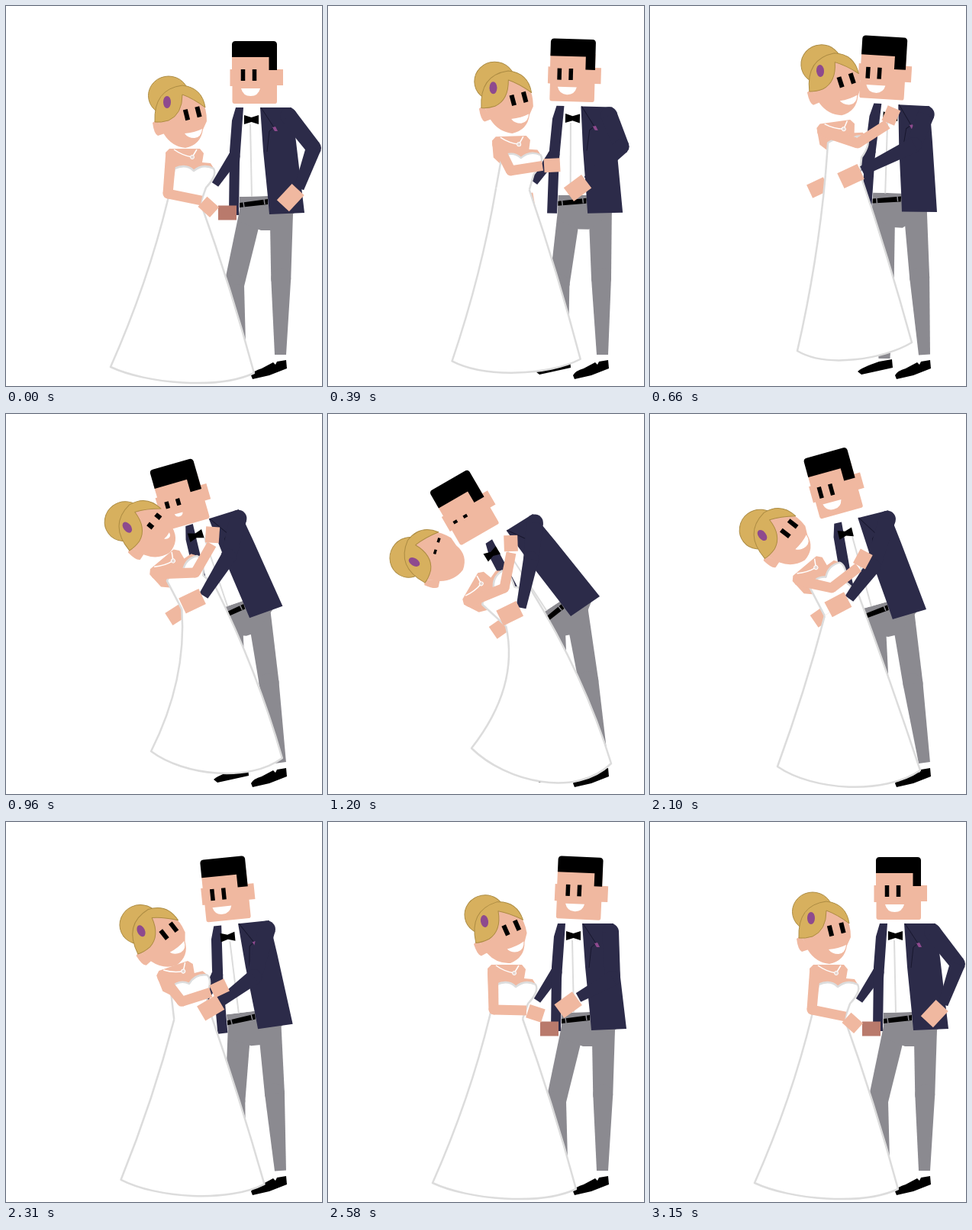
An HTML page with a canvas that plays this animation: 414x498 px, repeating every 3210 ms.

```html
<!DOCTYPE html>
<html lang="en">
<head>
<meta charset="utf-8">
<title>Dancing couple</title>
<style>
html, body { margin: 0; width: 100%; height: 100%; overflow: hidden; background: #fff; }
canvas { display: block; }
</style>
</head>
<body>
<canvas id="stage" width="414" height="498"></canvas>
<script>
const ctx = document.getElementById('stage').getContext('2d');
const LOOP = 3210, STEP = 30;
const SKIN = '#f0b8a0', SHADE = '#b97a6c', NAVY = '#2c2b49', GREY = '#8b8a90';
const LINE = '#dcdcdc', HAIR = '#d7b05e', HAIR_EDGE = '#ad8c43', PURPLE = '#8e4a8e';

// Each pose holds only joints; three numbers are x, y and a turn in degrees.
const stand = {
  coat: [391, 271, 0], elbow: [403, 186], wrist: [384, 239, 133], grip: [290, 271, 0],
  head: [325.5, 87, 0], look: [0],
  chest: [234, 256, 0], herElbow: [212, 246], herWrist: [256, 255, 42], herHead: [211, 126, 0],
  hem: [137, 473, 325, 481], flare: [11]
};
const embrace = {
  coat: [376, 270, 3], elbow: [346, 182], wrist: [278, 216, 155], grip: [220, 238, -25],
  head: [305.5, 81, 3.5], look: [1],
  chest: [252, 220, -8], herElbow: [272, 180], herWrist: [311, 155, -67], herHead: [223, 85, -4],
  hem: [193, 452, 343, 441], flare: [8]
};
const dip = {
  coat: [356, 239, -32], elbow: [266, 190], wrist: [253, 254, 154], grip: [226, 280, -35],
  head: [178.5, 122.5, -30], look: [1],
  chest: [246, 260, -60], herElbow: [231, 228], herWrist: [240, 182, -92], herHead: [113, 194, -59],
  hem: [188, 438, 371, 458], flare: [40]
};
const rise = {
  coat: [362, 256, -14], elbow: [292, 200], wrist: [261, 242, 152], grip: [225, 265, -35],
  head: [240, 90.5, -15.5], look: [1],
  chest: [247, 252, -40], herElbow: [238, 228], herWrist: [273, 201, -62], herHead: [147, 159, -38],
  hem: [167, 462, 354, 467], flare: [5]
};
const upright = {
  ...stand, elbow: [373, 205], wrist: [328, 230, 144], head: [329.5, 86.5, 2.5],
  herElbow: [217, 246], herWrist: [260, 247, 18], herHead: [205, 130, -10]
};
const poses = [stand, embrace, dip, dip, rise, upright, stand];

// Monotone cubic easing of one joint through all poses.
function joint(name, t, lift, end) {
  const times = [150, 660, 1200, lift, 2100, 2580, end], last = times.length - 1;
  if (t <= times[0] || t >= end) return stand[name];
  const i = times.findIndex((_, k) => t < times[k + 1]);
  const h = times[i + 1] - times[i], u = (t - times[i]) / h, v = 1 - u;
  return stand[name].map((_, c) => {
    const val = k => poses[k][name][c];
    const rate = k => (val(k + 1) - val(k)) / (times[k + 1] - times[k]);
    const slope = k => {
      if (k < 1 || k >= last) return 0;
      const p = rate(k - 1), q = rate(k);
      return p * q > 0 ? 2 * p * q / (p + q) : 0;
    };
    return val(i) * v * v * (1 + 2 * u) + val(i + 1) * u * u * (3 - 2 * u)
      + h * u * v * (slope(i) * v - slope(i + 1) * u);
  });
}
// His head leads on the way up; her arms and head settle last.
function poseAt(t) {
  const pose = {};
  for (const name in stand) {
    const late = /^(her|chest)/.test(name);
    pose[name] = joint(name, t, name === 'head' ? 1690 : 1770, late ? 3150 : 2850);
  }
  return pose;
}
function ramp(t, from, to) {
  const u = Math.min(1, Math.max(0, (t - from) / (to - from)));
  return u * u * (3 - 2 * u);
}

function svg(d, fill, stroke, width = 1) {
  const path = new Path2D(d);
  if (fill) { ctx.fillStyle = fill; ctx.fill(path); }
  if (stroke) { ctx.strokeStyle = stroke; ctx.lineWidth = width; ctx.stroke(path); }
}
function oval(x, y, rx, ry, fill, stroke) {
  ctx.beginPath();
  ctx.ellipse(x, y, rx, ry, 0, 0, 7);
  ctx.fillStyle = fill;
  ctx.fill();
  if (stroke) { ctx.strokeStyle = stroke; ctx.lineWidth = 1; ctx.stroke(); }
}
function box(x, y, w, h, fill) { ctx.fillStyle = fill; ctx.fillRect(x, y, w, h); }
function placed([x, y, deg = 0], draw) {
  ctx.save();
  ctx.translate(x, y);
  ctx.rotate(deg * Math.PI / 180);
  draw();
  ctx.restore();
}
// A point given in a turned part's own coordinates.
function on([x, y, deg], px, py) {
  const a = deg * Math.PI / 180, c = Math.cos(a), s = Math.sin(a);
  return [x + px * c - py * s, y + px * s + py * c];
}
// Tapered limb with round joints and a flat end.
function limb(joints, widths, fill) {
  for (let i = 0; i + 1 < joints.length; i++) {
    const [x, y] = joints[i], [X, Y] = joints[i + 1];
    const a = Math.atan2(Y - y, X - x), r = widths[i] / 2, R = widths[i + 1] / 2;
    const nx = -Math.sin(a), ny = Math.cos(a);
    oval(x, y, r, r, fill);
    svg(`M${x + nx * r} ${y + ny * r}L${X + nx * R} ${Y + ny * R}`
      + `L${X - nx * R} ${Y - ny * R}L${x - nx * r} ${y - ny * r}Z`, fill);
  }
}
const hand = (wrist, len, w) => placed(wrist, () => box(2, -w / 2, len, w, SKIN));
const middle = ([x, y], [X, Y], dx = 0) => [(x + X) / 2 + dx, (y + Y) / 2];

function drawMan({ coat, grip, look }) {
  svg('M272 479Q277 474 300 466L317 463L318 474L277 483Z', '#000');
  svg('M321 484Q324 478 335 475L350 467L353 470L355 466L367 464L368 475L345 484L323 489Z', '#000');
  const legs = [[-70, -2, 307, 462, 30, -15 * (1 - look[0])], [-30, -14, 359.5, 457, 31, 0]];
  for (const [hx, hy, x, y, width, bend] of legs) {
    const hip = on(coat, hx, hy), ankle = [x, y];
    limb([hip, middle(hip, ankle, bend), ankle], [width, 26, 15], GREY);
  }
  placed(coat, () => {
    svg('M-85 -21L-48 -22L-13 0L-44 23H-57L-85 12Z', GREY);
    svg('M-81 -138H-57L-48 -22L-85 -21Z', '#fff');
    svg('M-71 -116L-69 -21', null, LINE, 2);
    svg('M-85 -13L-48 -18V-11L-85 -7Z', '#000');
    svg('M-80 -14l1 7M-53 -18l1 7', null, GREY, 1.5);
  });
  limb([on(coat, -92, -74), on(coat, -117, -37)], [15, 10], NAVY);
  placed(coat, () => {
    svg('M-90 -138H-80L-85 -66L-86 3H-99L-98 -81L-95 -121Z', NAVY);
    svg('M-58 -138H-17L-11 -93L0 0L-46 2L-48 -21L-54 -81Z', NAVY);
    svg('M-57 -138L-40 -112L-46 -107L-49 -80', null, '#18172e');
    svg('M-42 -112l4 -1l3 6l-4 0Z', PURPLE);
    // The bow tie slides toward her as he leans.
    placed([-69.5 + coat[2] * .65, -122], () => svg('M-9.5 -6L0 -3L9.5 -6V6L0 3L-9.5 6Z', '#000'));
  });
  placed(grip, () => box(-12, -9.5, 24, 19, look[0] < .4 ? SHADE : SKIN));
}

function drawManHead({ head, look }, blink, smile) {
  const fx = -4.5 * look[0], fy = 4 * look[0], h = 15 * (1 - .72 * blink);
  placed(head, () => {
    svg('M-29.5 -22H29.5V-4H37.5V17H29.5V38Q29.5 41 27 41H-26Q-29 41 -29 38V18H-32V-4H-29.5Z', SKIN);
    svg(`M-29.5 ${fy - 20}V-37Q-29 -41 -25 -41H25Q29 -41 29.5 -37V${fy - 3}H${19 + fx}V${fy - 20}Z`, '#000');
    for (const x of [-15, 0]) box(x + fx - 2.75, 3.5 + fy + blink * 3 - h / 2, 5.5, h, '#000');
    placed([-5 + fx * .7, 21 + fy * .6], () => {
      ctx.scale(smile, smile);
      svg('M-12.5 0H12.5Q10 10 0 10Q-10 10 -12.5 0Z', '#fff');
    });
  });
}

function drawDress({ chest, hem, flare }) {
  const lean = chest[2], waist = 21 - lean / 4;
  placed(chest, () => {
    svg('M-25 -64L-20 -69H20L25 -63L23 -51L34 -50L39 -42L36 -30H-12L-24 -42Z', SKIN);
    svg(`M-22 -2L-13 -43Q2 -50 12 -40Q24 -50 38 -43Q43 -34 28 -18L${waist} 2`, '#fff', LINE, 2.5);
    svg('M-14 -68Q-3 -60 10 -58L16 -68', null, '#fff', 1.5);
    oval(10, -58, 2.5, 2.5, '#e6d5cf', '#fff');
  });
  const left = on(chest, -22, -2), right = on(chest, waist, 2);
  const hl = hem.slice(0, 2), hr = hem.slice(2);
  const inset = (hr[0] - hl[0]) / 4, sag = 22 + 23 * (lean / 60) ** 2;
  svg(`M${right}Q${middle(right, hr, flare[0] * .45)} ${hr}`
    + `C${hr[0] - inset} ${hr[1] + sag} ${hl[0] + inset} ${hl[1] + sag} ${hl}`
    + `Q${middle(left, hl, flare[0])} ${left}`, '#fff', LINE, 2.5);
}

function drawBrideHead({ herHead }, blink, smile) {
  placed(herHead, () => {
    oval(2, -8.5, 26.5, 25.5, HAIR, HAIR_EDGE);
    svg('M-19 27L-13 23L-3 41L-12 44Q-17 42 -19 27Z', SKIN);
    svg('M-14 20L-4 42Q6 58 24 60Q44 56 47 36L52 25Q52 8 46 0L20 -12Z', SKIN);
    svg('M-16 26Q-18 -17 20 -22Q46 -19 50 7Q34 -5 20 -10Q20 16 2 24Q-8 27 -16 26Z', HAIR, HAIR_EDGE);
    oval(0, 0, 5, 8, PURPLE);
    const h = 14 * (1 - .75 * blink);
    for (const x of [25.5, 41])
      placed([x, 23 - x / 4, -14], () => box(-3, -h / 2, 6, h, '#000'));
    placed([35, 41], () => {
      ctx.scale(smile, smile);
      svg('M-12 0Q1 -1 11 -6Q10 5 1 6Q-8 6 -12 0Z', '#fff');
    });
  });
}

function draw(t) {
  const pose = poseAt(t);
  const blink = ramp(t, 800, 1100) - ramp(t, 1760, 1850);
  const smile = 1 - ramp(t, 800, 1100) + ramp(t, 1800, 2000);
  box(0, 0, 414, 498, '#fff');
  ctx.lineJoin = 'round';
  drawMan(pose);
  drawManHead(pose, blink, smile);
  drawDress(pose);
  limb([on(pose.coat, -21, -127), pose.elbow, pose.wrist], [22, 20, 13], NAVY);
  hand(pose.wrist, 29, 22);
  limb([on(pose.chest, -18, -59), pose.herElbow, pose.herWrist], [14, 13, 13], SKIN);
  hand(pose.herWrist, 21, 18);
  drawBrideHead(pose, blink, smile);
}

function tick() {
  draw(Math.floor(performance.now() % LOOP / STEP) * STEP);
  requestAnimationFrame(tick);
}
tick();
</script>
</body>
</html>
```
